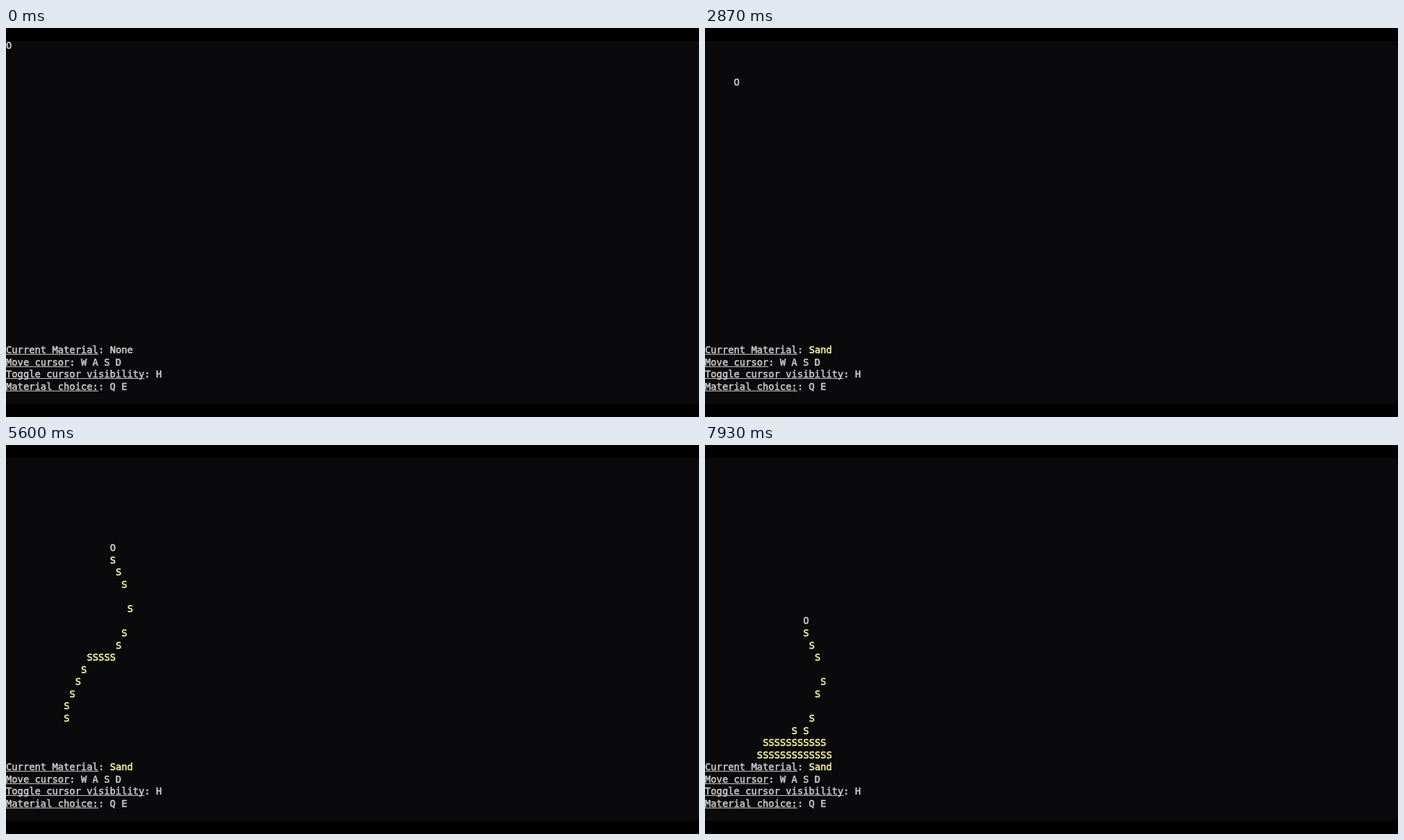
These frames come from a looping animation (998 px wide and 561 px high, 8000 ms). An HTML page with a canvas:

```html
<!DOCTYPE html>
<html lang="en">
<head>
<meta charset="utf-8">
<title>Falling sand</title>
<style>
  html, body { margin: 0; width: 100%; height: 100%; overflow: hidden; background: #000; }
  canvas { display: block; }
</style>
</head>
<body>
<canvas id="stage" width="998" height="561"></canvas>
<script>
const ctx = document.getElementById('stage').getContext('2d');

const LOOP = 8000, FRAME = 200 / 3;
const CELL_W = 998 / 120, CELL_H = 17.57, BASELINE = 30;
const ROWS = 25, COLS = 120;
const GREY = '#c6c6c6', YELLOW = '#f0eda0', SCREEN = '#0a0a0c';

// Simulation clock: the screen is rewritten from the bottom row upwards.
const FIRST_TICK = 2109.6, TICK = 126.175, ROW_TIME = 0.3;
const POUR_TICK = 12, SAND_CHOSEN = 2100;

// Cursor waypoints: tick, column, row.
const PATH = [
  [0, 0, 0], [3, 3, 3], [5, 5, 3], [6, 5, 3], [8, 7, 5], [11, 10, 5], [13, 10, 5],
  [17, 14, 5], [21, 18, 9], [23, 20, 9], [24, 21, 8], [25, 20, 7], [30, 15, 7],
  [35, 10, 12], [36, 12, 13], [38, 14, 15], [39, 15, 15], [40, 17, 15], [41, 18, 15],
  [42, 19, 14], [43, 20, 14], [44, 19, 13], [46, 17, 13]
];
const LAST_TICK = PATH[PATH.length - 1][0];

const HELP = [
  ['Current Material', ''],
  ['Move cursor', 'W A S D'],
  ['Toggle cursor visibility', 'H'],
  ['Material choice:', 'Q E']
];

function cursorAt(tick) {
  const next = PATH.findIndex(point => point[0] >= tick);
  if (next === 0) return { col: 0, row: 0 };
  const [t0, c0, r0] = PATH[next - 1], [t1, c1, r1] = PATH[next];
  const k = (tick - t0) / (t1 - t0);
  return { col: Math.round(c0 + (c1 - c0) * k), row: Math.round(r0 + (r1 - r0) * k) };
}

function fall(grid) {
  for (let row = ROWS - 2; row >= 0; row--) {
    for (let col = 0; col < COLS; col++) {
      if (!grid[row][col]) continue;
      const target = [col, col - 1, col + 1].find(c => c >= 0 && c < COLS && !grid[row + 1][c]);
      if (target === undefined) continue;
      grid[row][col] = false;
      grid[row + 1][target] = true;
    }
  }
}

function simulate() {
  const grid = Array.from({ length: ROWS }, () => Array(COLS).fill(false));
  const states = [];
  for (let tick = 0; tick <= LAST_TICK; tick++) {
    const cursor = cursorAt(tick);
    if (tick >= POUR_TICK) grid[cursor.row][cursor.col] = true;
    fall(grid);
    states.push({ cursor, grid: grid.map(row => row.slice()) });
  }
  return states;
}

const states = simulate();

function write(text, col, row, color) {
  const x = col * CELL_W, y = BASELINE + row * CELL_H;
  ctx.fillStyle = ctx.strokeStyle = color;
  ctx.fillText(text, x, y);
  ctx.strokeText(text, x, y);
}

function drawRow(state, row) {
  state.grid[row].forEach((sand, col) => { if (sand) write('S', col, row, YELLOW); });
  if (state.cursor.row === row) write('O', state.cursor.col, row, GREY);
}

function drawHelp(time) {
  HELP.forEach(([label, value], i) => {
    const row = ROWS + i;
    write(label + ': ' + value, 0, row, GREY);
    ctx.fillRect(0, Math.round(BASELINE + row * CELL_H + 1), label.length * CELL_W, 1);
  });
  const sand = time >= SAND_CHOSEN;
  write(sand ? 'Sand' : 'None', 18, ROWS, sand ? YELLOW : GREY);
}

function draw(time) {
  ctx.fillStyle = '#000';
  ctx.fillRect(0, 0, 998, 561);
  ctx.fillStyle = SCREEN;
  ctx.fillRect(0, 18.5, 998, 523.5);
  ctx.font = '13.815px "DejaVu Sans Mono", monospace';
  ctx.lineWidth = 0.6;
  ctx.lineJoin = 'round';

  const elapsed = Math.max(0, time - FIRST_TICK);
  const tick = Math.min(LAST_TICK, Math.floor(elapsed / TICK));
  const rowsDone = Math.floor((elapsed - tick * TICK) / ROW_TIME);
  for (let row = 0; row < ROWS; row++) {
    const written = row >= ROWS - rowsDone;
    drawRow(states[written ? tick : Math.max(0, tick - 1)], row);
  }
  drawHelp(time);
}

function play() {
  const time = performance.now() % LOOP;
  const frame = Math.min(119, Math.floor((time + 4) / FRAME));
  draw(frame * FRAME);
  requestAnimationFrame(play);
}
play();
</script>
</body>
</html>
```
